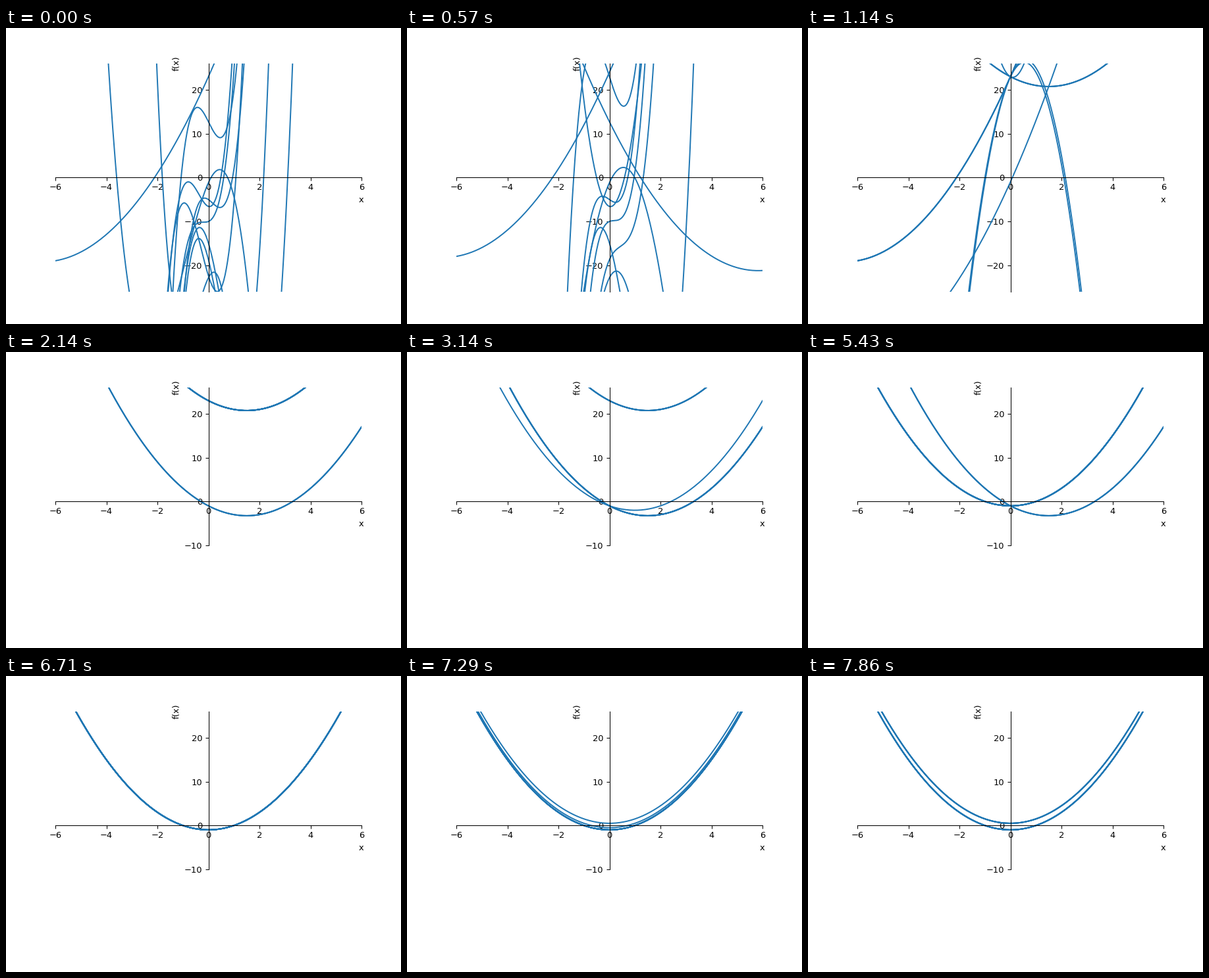
Write a matplotlib script that moves like this. It is 600x450 px and loops after 8000 ms.

```python
import numpy as np
import matplotlib.pyplot as plt
from matplotlib.animation import FuncAnimation
from numpy.polynomial import Polynomial

FRAMES = 56
SIZE = 10          # curves in the population
LIMIT = 26


def parabola(c, b, a=1):
    return [c, b, a, 0]


def cubic(hill, height, valley):
    """Cubic with a hill top and a valley; wide bends grow more gently."""
    gap = valley - hill
    grow = np.copysign(20 * np.exp(-(gap / 2.43) ** 4), gap)
    d = Polynomial([-hill, 1])
    return list((height + grow * (d ** 3 - 1.5 * gap * d ** 2)).coef)


rising, high = parabola(23, 13), parabola(23, -3)
shifted, centred, raised = parabola(-1, -3), parabola(-1, 0), parabola(0.5, 0)

random_start = [
    rising, cubic(0.44, 1.8, -2.27), cubic(-0.43, 16, 0.46),
    cubic(-0.79, -1, 0.04), cubic(-0.15, -4.7, 0.45),
    cubic(-0.95, -5.8, 0.35), cubic(-0.2, -10.2, -0.2),
    cubic(0.21, -21.6, -0.95), cubic(-0.35, -11.4, 1.89),
    cubic(-0.38, -13.9, 1.23),
]
crossed = [rising] * 3 + [high] * 3 + [
    parabola(23, 13, -11), parabola(23, 12, -11), parabola(23, -3, 16),
    parabola(-1, 13)]

# Settled populations: first generation, last generation, curves
STAGES = [
    (0, 0, random_start),
    (7, 8, crossed),
    (14, 15, [high] * 7 + [shifted] * 3),
    (30, 30, [shifted] * 9 + [centred]),
    (38, 38, [shifted] * 3 + [centred] * 7),
    (46, 47, [centred] * SIZE),
    (55, 55, [raised] * 4 + [centred] * 6),
]


def evolve():
    """Swap coefficients one by one between stages and add brief mutants."""
    rng = np.random.default_rng(4)
    history = np.zeros((FRAMES, SIZE, 4))
    for first, last, curves in STAGES:
        history[first:last + 1] = curves
    for (_, start, old), (end, _, new) in zip(STAGES, STAGES[1:]):
        swap = rng.integers(start + 1, end + 1, (SIZE, 4))
        for n in range(start + 1, end):
            history[n] = np.where(n >= swap, new, old)
            slot, gene = rng.integers(SIZE), rng.integers(3)
            span = 12 - n // 6
            history[n, slot, gene] += rng.integers(-span, span + 1)
    return history


history = evolve()
x = np.linspace(-6, 6, 241)
powers = x ** np.arange(4)[:, None]

fig, ax = plt.subplots(figsize=(6.4, 4.8), dpi=93.75)
fig.subplots_adjust(left=0.125, right=0.9, bottom=0.11, top=0.88)
ax.set(xlim=(-6, 6), ylim=(-LIMIT, LIMIT), xticks=range(-6, 7, 2))
for side in ("top", "right"):
    ax.spines[side].set_visible(False)
for side in ("left", "bottom"):
    ax.spines[side].set_position(("data", 0))
ax.set_xlabel("x", x=1, ha="center")
ax.set_ylabel("f(x)", y=1, ha="center")
lines = [ax.plot([], [], color="#1f77b4", lw=1.5)[0] for _ in range(SIZE)]


def draw(n):
    curves = history[n] @ powers
    for line, y in zip(lines, curves):
        line.set_data(x, y)
    # The vertical axis reaches down to the first tick below the data
    low = max(10 * np.floor(curves.min() / 10), -LIMIT)
    ax.set_yticks([t for t in range(-20, 30, 10) if t >= low])
    ax.spines["left"].set_bounds(low, LIMIT)
    return lines


anim = FuncAnimation(fig, draw, frames=FRAMES, init_func=lambda: draw(0),
                     interval=8000 / FRAMES, repeat=True, repeat_delay=0)
plt.show()
```
